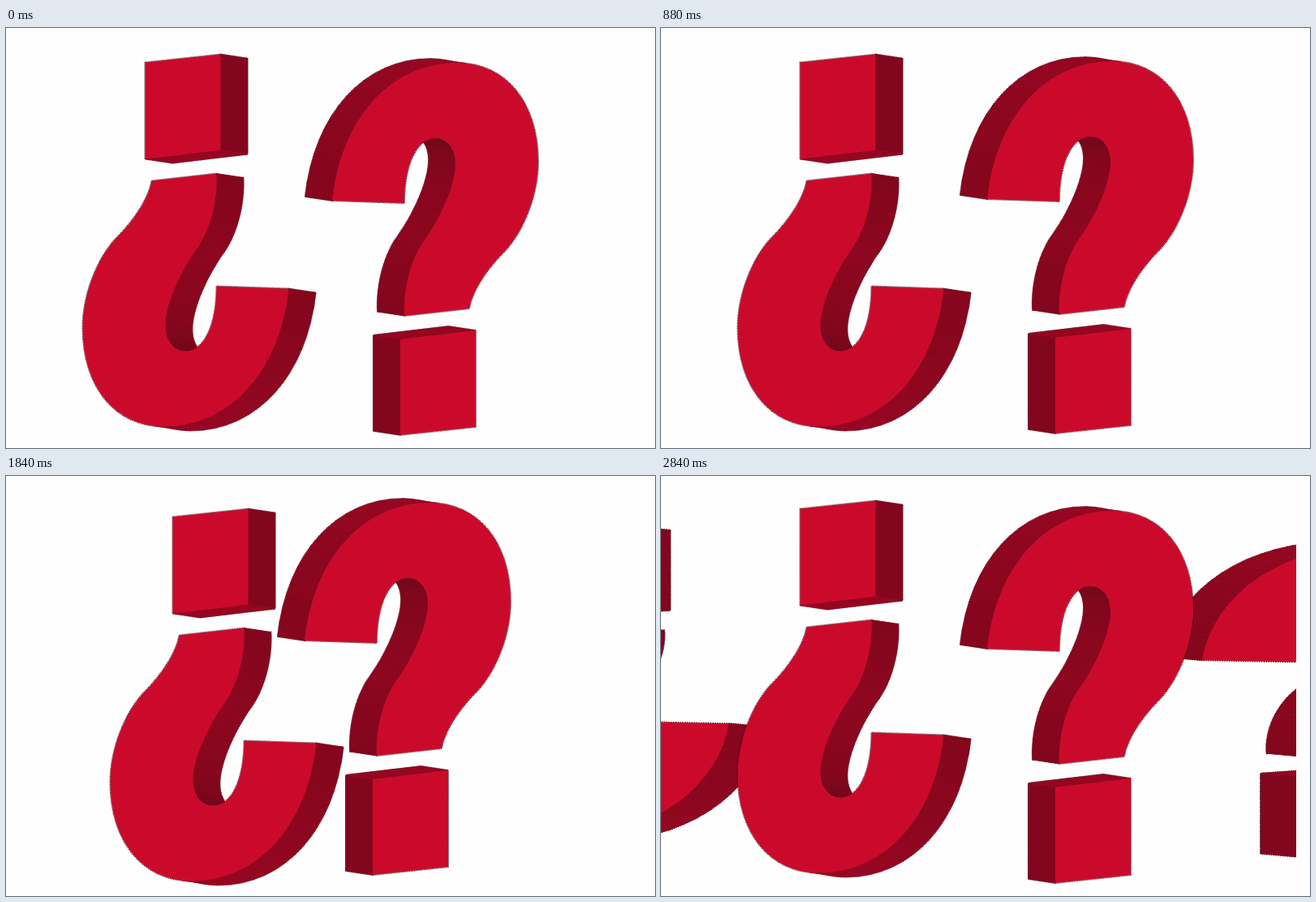
These frames come from a looping animation (800 by 518 pixels, 2880 ms). An HTML page with a canvas:

```html
<!DOCTYPE html>
<html lang="en">
<head>
<meta charset="utf-8">
<title>Question marks</title>
<style>
html, body { margin: 0; width: 100%; height: 100%; overflow: hidden; background: #fefefe; }
canvas { display: block; }
</style>
</head>
<body>
<canvas id="stage" width="800" height="518"></canvas>
<script>
const ctx = document.getElementById('stage').getContext('2d');
const LOOP = 2880, STEP = 80;
const DEPTH = { x: -33, y: -5 };
const PAPER = '#fefefe', FACE = '#cb0a2b', EDGE = '#2a0008';
const ROUNDNESS = 0.6;

// Outline builder: straight lines, and bends that lean towards a corner.
class Outline {
  constructor(x, y) { this.points = [{ x, y }]; }
  line(x, y) {
    this.points.push({ x, y });
    return this;
  }
  bend(cornerX, cornerY, x, y) {
    const from = this.points[this.points.length - 1];
    const cubic = (a, corner, b, t) => {
      const s = 1 - t;
      const c1 = a + (corner - a) * ROUNDNESS, c2 = b + (corner - b) * ROUNDNESS;
      return s * s * s * a + 3 * s * t * (s * c1 + t * c2) + t * t * t * b;
    };
    for (let i = 1; i <= 16; i++) {
      this.line(cubic(from.x, cornerX, x, i / 16), cubic(from.y, cornerY, y, i / 16));
    }
    return this;
  }
}

const hook = new Outline(402, 213)
  .bend(420, 43, 556, 43)
  .bend(656, 43, 656, 165)
  .bend(656, 229, 616, 274)
  .bend(576, 313, 571, 346)
  .line(491, 355)
  .bend(488, 298, 517, 260)
  .bend(554, 206, 554, 168)
  .bend(554, 136, 529, 136)
  .bend(491, 136, 491, 216);

const dot = new Outline(486, 502).line(486, 384).line(579, 373).line(579, 492);

function polygon(points) {
  const path = new Path2D();
  points.forEach(({ x, y }) => path.lineTo(x, y));
  path.closePath();
  return path;
}

const toBack = ({ x, y }) => ({ x: x + DEPTH.x, y: y + DEPTH.y });

// Extruded solid: side walls are shaded by how far they face upwards.
function solid({ points }) {
  const walls = [];
  points.forEach((a, i) => {
    const b = points[(i + 1) % points.length];
    const nx = b.y - a.y, ny = a.x - b.x;
    if (nx * DEPTH.x + ny * DEPTH.y <= 0) return;
    const red = Math.round(130 - 19 * ny / Math.hypot(nx, ny));
    walls.push({
      path: polygon([a, b, toBack(b), toBack(a)]),
      color: `rgb(${red}, 6, ${Math.round(red * 0.22)})`
    });
  });
  return { front: polygon(points), back: polygon(points.map(toBack)), walls };
}

const solids = [solid(hook), solid(dot)];

function drawMark() {
  ctx.lineJoin = 'bevel';
  for (const { front, back, walls } of solids) {
    ctx.strokeStyle = EDGE;
    ctx.lineWidth = 2;
    ctx.setLineDash([1, 1]);
    for (const path of [back, front, walls[0].path, walls[walls.length - 1].path]) ctx.stroke(path);

    ctx.setLineDash([]);
    ctx.lineWidth = 1;
    for (const { path, color } of walls) {
      ctx.fillStyle = ctx.strokeStyle = color;
      ctx.fill(path);
      ctx.stroke(path);
    }
    ctx.fillStyle = FACE;
    ctx.fill(front);
  }
}

// The inverted mark is the upright one turned half a circle about the middle.
function drawPair({ inward = 0, upright = 0, inverted = 0, stretched = false }) {
  for (const turned of [true, false]) {
    ctx.save();
    ctx.beginPath();
    ctx.rect(0, 0, 783, 518);
    ctx.clip();
    if (turned) {
      ctx.translate(750.5, 534.5 + inverted);
      ctx.scale(-1, -1);
    } else {
      ctx.translate(0, upright);
    }
    ctx.translate(-inward, 0);
    if (stretched) {
      ctx.translate(824, 276);
      ctx.scale(1.43, 0.84);
      ctx.translate(-512, -271);
    }
    drawMark();
    ctx.restore();
  }
}

function render(time) {
  const t = Math.floor(time / STEP) * STEP;
  ctx.fillStyle = PAPER;
  ctx.fillRect(0, 0, 800, 518);

  if (t === 0) {
    drawPair({});
  } else if (t <= 1680) {
    const bob = Math.round(16.5 * Math.sin(2 * Math.PI * (t - 78) / 800));
    drawPair({ inverted: bob, upright: -bob - 2 });
  } else if (t < 2080) {
    // Gather inwards, then shoot out to the sides.
    const inward = Math.round(34 * Math.sin(Math.PI * (t - 1680) / 320));
    drawPair({ inward, inverted: 8, upright: -10, stretched: t >= 2000 });
  } else if (time >= 2760) {
    drawPair({ inverted: -2, stretched: true });
    if (time >= 2840) drawPair({ inverted: -2 });
  }
}

const start = performance.now();
function tick() {
  render((performance.now() - start) % LOOP);
  requestAnimationFrame(tick);
}
tick();
</script>
</body>
</html>
```
